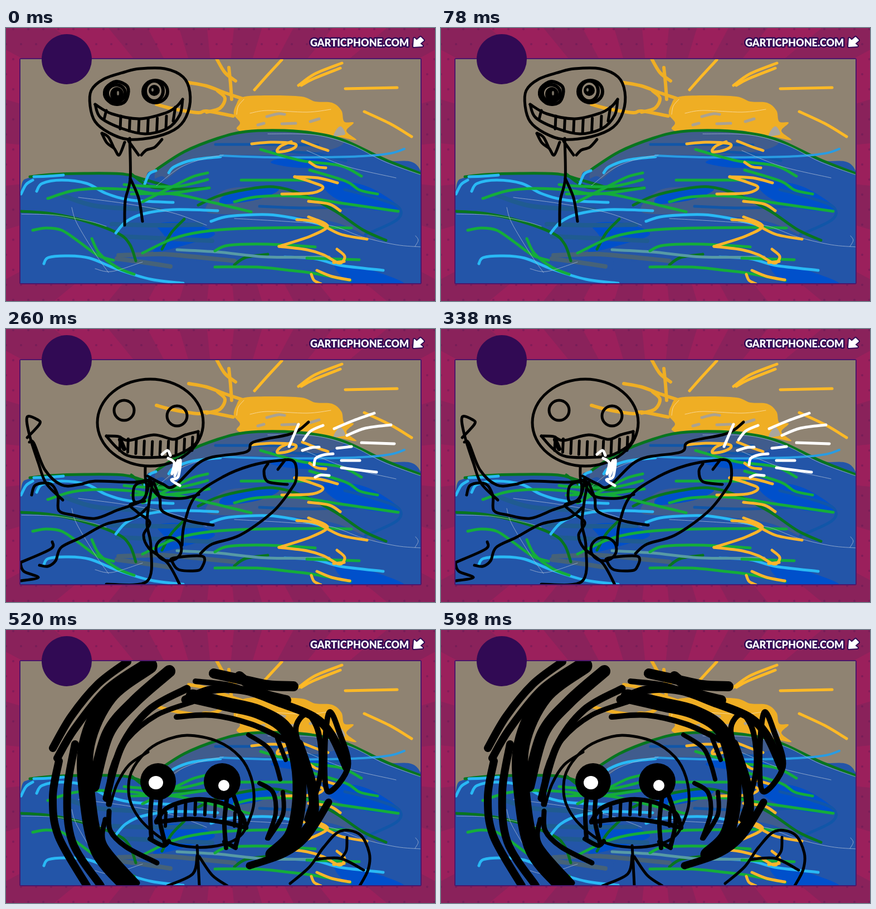
Recreate the animation shown at these times as an HTML page with a canvas. Size 770 by 490 pixels, loop 650 ms.

```html
<!DOCTYPE html>
<html lang="en">
<head>
<meta charset="utf-8">
<title>Waves at sunset</title>
<style>
html, body { margin: 0; width: 100%; height: 100%; overflow: hidden; background: #97205b; }
canvas { display: block; }
</style>
</head>
<body>
<canvas id="stage" width="770" height="490"></canvas>
<script>
const W = 770, H = 490, STEP = 130;
const stage = document.getElementById('stage').getContext('2d');
const backdrop = document.createElement('canvas');
backdrop.width = W;
backdrop.height = H;
let g = backdrop.getContext('2d');

// Smooth curve through the given x, y pairs.
function curve(p) {
  const path = new Path2D(), n = p.length / 2;
  const closed = n > 3 && p[0] === p[2 * n - 2] && p[1] === p[2 * n - 1];
  const at = i => {
    if (closed) i = (i + n - 1) % (n - 1);
    i = Math.max(0, Math.min(n - 1, i));
    return [p[2 * i], p[2 * i + 1]];
  };
  path.moveTo(p[0], p[1]);
  for (let i = 0; i < n - 1; i++) {
    const [a, b, c, d] = [at(i - 1), at(i), at(i + 1), at(i + 2)];
    path.bezierCurveTo(b[0] + (c[0] - a[0]) / 6, b[1] + (c[1] - a[1]) / 6,
      c[0] - (d[0] - b[0]) / 6, c[1] - (d[1] - b[1]) / 6, c[0], c[1]);
  }
  return path;
}
function pen(color, width) {
  g.strokeStyle = color;
  g.lineWidth = width;
  g.lineCap = g.lineJoin = 'round';
}
const line = (...p) => g.stroke(curve(p));
function thick(width, ...p) {
  g.lineWidth = width;
  line(...p);
}
function area(color, ...p) {
  g.fillStyle = color;
  g.fill(curve(p));
}
function oval(x, y, rx, ry = rx, color) {
  g.beginPath();
  g.ellipse(x, y, rx, ry, 0, 0, 7);
  if (color) {
    g.fillStyle = color;
    g.fill();
  } else g.stroke();
}
function panel(draw) {
  g.save();
  g.beginPath();
  g.rect(26, 56, 718, 402);
  g.clip();
  draw();
  g.restore();
}

function wallpaper() {
  g.fillStyle = '#9b205c';
  g.fillRect(0, 0, W, H);
  g.fillStyle = '#8a225b';
  for (let i = 0; i < 16; i++) {
    const a = (i + .25) * Math.PI / 8;
    g.beginPath();
    g.moveTo(385, 245);
    g.arc(385, 245, 500, a, a + Math.PI / 16);
    g.fill();
  }
  for (let row = 0; row < 19; row++)
    for (let x = row % 2 ? 0 : 13; x < W; x += 27)
      oval(x, row * 27 + 2, 2, 2, 'rgba(82,24,82,.35)');
  g.fillStyle = '#4c176b';
  g.beginPath();
  g.roundRect(24, 54, 722, 406, 3);
  g.fill();
}

function sun() {
  pen('#efae24', 6);
  line(328, 98, 360, 104, 395, 117, 425, 127);
  line(270, 137, 300, 145, 345, 152, 360, 149, 408, 158);
  line(360, 151, 384, 144, 393, 126, 380, 113);
  line(378, 55, 393, 80, 412, 95);
  line(400, 71, 403, 100, 405, 128);
  pen('#ffb926', 5);
  line(446, 111, 470, 84, 495, 57);
  line(525, 103, 555, 82, 603, 63);
  line(530, 103, 552, 91, 600, 72);
  line(609, 109, 702, 107);
  line(643, 150, 690, 172, 728, 195);
  area('#efae24', 409, 155, 413, 138, 425, 124, 470, 121, 530, 123, 555, 132, 585, 134,
    602, 148, 607, 168, 624, 170, 611, 185, 629, 201, 600, 196, 575, 194, 540, 184,
    500, 186, 460, 183, 430, 187, 414, 181, 420, 170, 409, 155);
  pen('#aaa292', 5);
  line(468, 159, 488, 154, 500, 155);
  line(452, 174, 463, 171);
  line(495, 172, 520, 171);
  line(546, 168, 562, 163);
  area('#aaa69d', 588, 194, 594, 181, 602, 177, 609, 190, 600, 193, 588, 194);
  pen('#f7d798', 1);
  line(414, 155, 417, 140, 427, 128);
  line(438, 153, 470, 148, 540, 151, 583, 146);
}

function water() {
  const sea = '#2355a8', slate = '#405c8d', vivid = '#0050cb';
  area(sea, 250, 280, 270, 254, 320, 222, 380, 198, 430, 187, 500, 185, 560, 190,
    610, 203, 680, 236, 746, 262, 746, 460, 250, 460, 250, 280);
  area(slate, 270, 256, 320, 223, 380, 199, 430, 187, 500, 186, 560, 191, 606, 204,
    575, 220, 490, 228, 390, 229, 330, 241, 278, 278, 270, 256);
  area(sea, 26, 297, 42, 268, 75, 263, 150, 261, 220, 262, 255, 274, 290, 281,
    290, 460, 26, 460, 26, 297);
  area(slate, 395, 290, 480, 287, 525, 298, 580, 323, 625, 356, 665, 382, 595, 350,
    520, 338, 450, 334, 360, 330, 395, 290);
  area(vivid, 475, 241, 515, 231, 590, 240, 560, 250, 515, 250, 475, 241);
  area(vivid, 570, 278, 625, 278, 670, 295, 708, 326, 650, 325, 590, 305, 570, 278);
  area(vivid, 390, 302, 440, 288, 490, 289, 455, 307, 390, 316, 390, 302);
  area(vivid, 272, 352, 330, 350, 375, 370, 320, 390, 265, 402, 285, 377, 272, 352);
  area(vivid, 590, 424, 650, 433, 715, 460, 625, 460, 590, 424);
  pen('#1156a8', 5);
  line(376, 209, 450, 209, 560, 210);
  line(480, 222, 550, 225, 610, 238);
  line(608, 290, 660, 304, 704, 321, 702, 344, 645, 371);
  line(455, 320, 540, 323, 630, 320);
  pen('#1f5b91', 8);
  line(100, 300, 165, 320, 275, 326);
  line(190, 352, 270, 354, 350, 353);
  line(200, 374, 290, 378, 370, 382);
  pen('#466278', 8);
  line(202, 408, 260, 406, 300, 407, 410, 418);
  line(199, 414, 250, 421, 295, 428);
}

function waveLines() {
  pen('#08751f', 5);
  line(270, 254, 320, 222, 380, 198, 430, 186, 500, 184, 560, 190, 610, 203, 680, 236, 746, 262);
  line(43, 267, 80, 263, 140, 261, 210, 262, 245, 271, 300, 287);
  line(26, 329, 80, 333, 140, 346, 200, 368, 222, 388, 233, 418);
  line(225, 262, 260, 285, 320, 289, 365, 287);
  line(345, 318, 380, 302, 430, 290, 480, 285, 530, 298, 590, 328, 640, 362, 682, 381);
  line(280, 397, 297, 367, 320, 343);
  line(410, 425, 430, 412, 470, 406);
  pen('#29b9f5', 5);
  line(27, 298, 36, 281, 48, 273);
  line(50, 267, 75, 266, 103, 264);
  line(55, 293, 65, 279, 100, 273, 145, 279, 180, 297, 225, 309, 300, 313);
  line(249, 280, 257, 262, 269, 256);
  line(292, 260, 302, 249, 335, 237, 385, 231);
  line(197, 368, 215, 348, 245, 334, 300, 326, 380, 328);
  line(368, 347, 400, 338, 470, 335, 520, 342, 575, 355);
  line(68, 423, 76, 412, 110, 409, 150, 413, 200, 433, 260, 451, 318, 458);
  line(500, 411, 555, 414, 600, 426, 677, 435);
  pen('#299ce3', 4);
  line(385, 229, 470, 232, 560, 232, 640, 230, 690, 225, 715, 217);
  pen('#579aa6', 5);
  line(307, 398, 380, 402, 470, 411, 580, 411);
  pen('#14ad3a', 5);
  line(75, 306, 120, 292, 170, 288, 230, 291, 280, 298, 365, 287);
  line(212, 281, 252, 284, 310, 284, 362, 272);
  line(245, 312, 300, 284, 335, 267, 362, 260);
  line(225, 298, 300, 298, 370, 313, 440, 330);
  line(422, 273, 480, 273, 545, 273);
  line(457, 218, 530, 238, 600, 247, 638, 266);
  line(545, 255, 610, 275, 635, 291, 667, 298);
  line(410, 312, 450, 303, 520, 302, 600, 314, 704, 329);
  line(245, 404, 300, 378, 350, 366, 420, 360, 560, 358, 620, 359);
  line(375, 400, 400, 390, 470, 388, 555, 393);
  line(375, 429, 450, 429, 500, 434, 550, 440, 618, 453);
  line(48, 363, 72, 359, 100, 363, 130, 383, 165, 408, 193, 417);
  line(154, 378, 168, 405, 200, 430, 230, 442);
  line(540, 413, 634, 416);
  pen('#a6b8d4', .8);
  line(270, 283, 310, 252, 350, 236, 390, 228);
  line(470, 190, 555, 192, 620, 210, 680, 240, 746, 264);
  line(28, 334, 90, 336, 150, 347, 180, 356);
  line(130, 304, 220, 316, 300, 332, 360, 354);
  line(118, 322, 127, 350, 160, 405, 184, 439);
  line(410, 342, 500, 347, 580, 354, 640, 375, 700, 389, 746, 393);
  line(540, 220, 610, 248, 700, 269);
  line(160, 432, 190, 437, 245, 420);
  line(735, 373, 740, 381, 734, 392);
}

function glitter() {
  pen('#ffb52b', 5);
  line(441, 208, 475, 205, 515, 207, 520, 213, 506, 220, 487, 222, 493, 212, 512, 204);
  line(532, 203, 555, 212, 578, 220);
  line(545, 241, 558, 249, 574, 251);
  line(518, 267, 560, 269, 595, 278);
  line(518, 267, 550, 277, 569, 286, 550, 296, 495, 298);
  line(543, 311, 580, 316, 600, 328);
  line(522, 344, 555, 348, 600, 370, 648, 379);
  line(543, 339, 577, 355, 548, 373, 490, 392);
  line(490, 392, 540, 398, 570, 407, 598, 422, 608, 410, 594, 397);
  line(588, 421, 607, 419);
  line(548, 442, 553, 453, 565, 459);
  line(558, 435, 585, 446, 617, 452);
}

function header() {
  oval(109, 56, 45, 45, '#310a54');
  pen('#310a54', 5);
  g.font = '900 18px Lato, "Open Sans", sans-serif';
  g.strokeText('GARTICPHONE.COM', 546, 33);
  g.fillStyle = '#fff';
  g.fillText('GARTICPHONE.COM', 546, 33);
  const arrow = new Path2D('M733 19L737 23L744 17L749 22L742 28L747 32L732 33Z');
  pen('#310a54', 6);
  g.stroke(arrow);
  pen('#fff', 2);
  g.stroke(arrow);
  g.fill(arrow);
}

// Vertical strokes spread between two curved lips.
function teeth(x0, x1, count, top, height, bow) {
  for (let i = 0; i < count; i++) {
    const u = i / (count - 1), x = x0 + (x1 - x0) * u;
    const y = top + bow * 4 * u * (1 - u);
    line(x, y, x - 1, y + height);
  }
}

function grinner() {
  line(213, 79, 240, 73, 285, 73, 318, 88, 330, 115, 327, 150, 309, 178, 270, 195,
    220, 200, 185, 188, 160, 168, 151, 140, 153, 112, 175, 92, 213, 79);
  thick(6, 217, 104, 198, 96, 180, 107, 178, 123, 192, 136, 211, 134, 219, 119, 217, 104);
  oval(198, 117, 16, 15);
  oval(199, 119, 12, 13, '#000');
  oval(201, 117, 2, 4, '#777063');
  oval(268, 114, 22, 20);
  oval(266, 113, 16, 18);
  oval(266, 112, 10, 10, '#000');
  oval(263, 111, 2, 3, '#777063');
  g.lineWidth = 5;
  line(160, 137, 190, 154, 240, 163, 285, 153, 306, 141, 317, 128);
  line(160, 137, 170, 161, 210, 181, 250, 190, 290, 180, 312, 156, 317, 128);
  line(180, 148, 176, 164);
  teeth(206, 288, 6, 158, 23, 6);
  line(304, 142, 300, 167);
  line(172, 189, 181, 206, 194, 216, 203, 228, 213, 205);
  line(173, 189, 184, 196, 193, 214);
  line(220, 203, 238, 228);
  line(280, 200, 267, 214, 252, 219, 243, 228);
  line(222, 198, 223, 270, 214, 310, 213, 354);
  line(223, 270, 238, 305, 245, 347);
}

function starer() {
  line(230, 86, 270, 83, 315, 94, 345, 125, 354, 165, 349, 205, 330, 235, 290, 247,
    240, 247, 190, 228, 160, 200, 154, 173, 172, 122, 200, 97, 230, 86);
  oval(213, 149, 36, 34, '#000');
  oval(211, 147, 12, 14, '#fff');
  oval(303, 156, 36, 39, '#000');
  oval(306, 155, 14, 14, '#fff');
  pen('#777063', 1.5);
  line(279, 163, 278, 142, 286, 129);
  line(285, 179, 303, 186, 319, 181);
  pen('#000', 2);
  line(299, 158, 305, 150, 312, 152, 307, 160);
  g.lineWidth = 5;
  line(177, 190, 220, 197, 280, 200, 338, 194);
  line(183, 193, 196, 213, 245, 228, 285, 229, 321, 217, 335, 194);
  teeth(195, 328, 10, 193, 19, 12);
  line(187, 173, 186, 200);
  line(199, 181, 198, 207);
  line(335, 178, 335, 224);
  line(257, 249, 258, 295, 266, 350, 270, 412, 259, 438, 245, 459);
  line(270, 412, 287, 431, 303, 459);
  line(257, 250, 248, 282, 240, 298, 195, 319, 157, 346, 142, 343, 122, 319, 109, 294, 92, 285, 82, 285);
  line(259, 260, 274, 286, 300, 303, 350, 302, 385, 302, 416, 311);
}

function manyArms() {
  oval(259, 168, 95, 78);
  oval(212, 146, 18);
  oval(307, 156, 18);
  line(180, 192, 202, 193, 220, 200, 265, 190, 301, 198, 322, 190, 345, 184);
  line(180, 192, 200, 214, 225, 229, 280, 230, 310, 225, 341, 205, 345, 184);
  teeth(205, 335, 10, 194, 24, 8);
  thick(8, 205, 199, 212, 215);
  g.lineWidth = 5;
  line(250, 247, 251, 271, 262, 276, 257, 310, 253, 350, 260, 390, 253, 453, 180, 458);
  line(38, 195, 60, 171, 57, 163, 38, 158, 42, 190, 58, 240, 72, 277, 102, 307);
  line(42, 203, 50, 205, 70, 253, 100, 280, 132, 279, 160, 273, 230, 275, 258, 270);
  line(46, 298, 53, 280, 80, 278, 93, 299, 95, 326, 120, 334, 160, 340, 200, 325, 245, 307, 257, 277);
  line(230, 309, 231, 282, 251, 276, 249, 304, 230, 309);
  line(254, 264, 281, 278, 302, 282, 355, 235, 430, 221, 444, 203, 505, 190, 526, 181, 543, 167);
  line(257, 276, 275, 300, 316, 304, 346, 297);
  line(316, 388, 320, 350, 340, 300, 390, 265, 440, 245, 490, 236, 517, 238, 521, 268,
    510, 290, 478, 329, 420, 370, 370, 386, 349, 403);
  line(470, 242, 463, 255, 470, 274, 505, 279);
  line(501, 235, 488, 252);
  line(265, 275, 276, 304, 282, 328, 330, 345, 372, 352);
  line(249, 309, 223, 315, 236, 329, 258, 347, 247, 370, 257, 394, 290, 420, 312, 459);
  line(253, 321, 230, 339, 180, 350, 135, 374, 99, 392, 89, 416, 75, 426, 60, 424);
  line(83, 382, 80, 395, 26, 419);
  line(26, 421, 32, 435, 58, 446, 26, 452);
  oval(292, 395, 23, 21);
  line(299, 419, 301, 411, 353, 408, 351, 429, 339, 434, 310, 432, 299, 419);
  pen('#fff', 5);
  line(280, 225, 290, 218, 295, 227);
  line(291, 232, 302, 240, 298, 260, 309, 236, 303, 264, 313, 235, 309, 265, 297, 271, 312, 281);
  line(525, 171, 508, 211);
  line(569, 173, 547, 183, 534, 199);
  line(589, 179, 622, 165, 661, 151);
  line(612, 191, 645, 178, 691, 172);
  line(532, 218, 548, 213, 562, 212);
  line(594, 214, 620, 211);
  line(638, 204, 697, 206);
  line(553, 244, 556, 232, 570, 226, 587, 224);
  line(602, 236, 635, 236);
  line(555, 266, 565, 262, 580, 263);
  line(602, 249, 632, 253, 665, 257);
}

function boxyHead() {
  line(185, 105, 240, 95, 268, 90, 295, 91, 327, 109, 353, 138, 353, 183, 341, 211,
    300, 235, 255, 247, 213, 234, 184, 211, 177, 173, 168, 140, 171, 117, 185, 105);
  line(192, 131, 210, 128, 236, 131, 237, 147, 227, 162, 193, 160, 192, 131);
  oval(211, 147, 6, 6, '#000');
  line(287, 157, 292, 146, 318, 144, 323, 157, 310, 170, 293, 169, 287, 157);
  oval(306, 157, 4, 4, '#000');
  g.lineWidth = 4;
  for (let i = 0; i < 6; i++) oval(191 + i * 28, 184 - (i % 3) * 2, 10 + (i % 2) * 5, 8 - (i % 2) * 2);
  for (let i = 0; i < 6; i++) {
    const u = i / 5;
    oval(195 + 140 * u, 206 + 62 * u * (1 - u), 11, 7);
  }
  line(205, 192, 188, 207, 205, 222, 245, 229, 285, 226, 320, 218, 342, 204, 340, 190);
  line(233, 214, 246, 207, 280, 205, 295, 214);
  g.lineWidth = 5;
  line(472, 152, 471, 158, 474, 164);
  line(533, 147, 535, 160);
  line(475, 181, 493, 179, 520, 180, 542, 179, 557, 187);
  line(256, 243, 256, 306, 246, 345, 256, 378, 243, 419, 231, 452);
  line(250, 363, 262, 395, 295, 424, 312, 458);
  line(370, 306, 300, 290, 255, 268, 237, 273, 237, 289, 257, 315, 282, 340,
    330, 374, 385, 387, 425, 370, 444, 344);
  line(277, 347, 300, 322, 340, 307, 390, 302, 450, 305, 510, 323, 560, 348, 597, 375, 600, 420);
  line(285, 351, 325, 344, 430, 346, 480, 354, 530, 377, 556, 390);
  oval(270, 365, 11, 23);
  oval(294, 368, 11, 21);
  line(420, 333, 434, 346);
  line(431, 330, 441, 346);
  line(453, 334, 448, 348);
  line(602, 365, 572, 379, 554, 399, 565, 413, 598, 419);
  line(586, 399, 599, 421, 604, 402);
}

function bigHair() {
  line(220, 290, 225, 255, 250, 220, 280, 200, 325, 189, 380, 200, 420, 228, 440, 265,
    445, 310, 435, 345, 420, 370, 390, 385, 340, 390, 290, 380, 250, 350, 228, 320, 220, 290);
  oval(273, 272, 32, 33, '#000');
  oval(388, 272, 33, 33, '#000');
  oval(269, 274, 13, 12, '#fff');
  oval(391, 279, 10, 10, '#fff');
  thick(8, 262, 295, 259, 333, 261, 374);
  line(278, 297, 276, 340, 285, 381);
  line(397, 298, 392, 345, 395, 391);
  line(406, 290, 421, 340, 412, 389);
  line(258, 375, 282, 387, 292, 379);
  line(392, 380, 412, 391);
  line(270, 343, 291, 318, 340, 304, 385, 310, 420, 328, 431, 354);
  line(270, 345, 330, 339, 390, 345, 431, 355);
  g.lineWidth = 6;
  teeth(287, 411, 8, 328, 24, -21);
  g.lineWidth = 5;
  line(343, 387, 345, 420, 347, 459);
  line(343, 405, 335, 438, 290, 459);
  line(347, 407, 370, 440, 397, 459);
  line(510, 455, 545, 425, 570, 390, 600, 361, 635, 367, 652, 400, 650, 430, 635, 459);
  line(555, 412, 600, 410, 642, 431);
  line(612, 372, 611, 395, 603, 408);

  thick(14, 218, 57, 165, 97, 117, 155, 84, 212);
  line(248, 60, 180, 107, 122, 179, 92, 230);
  line(95, 235, 84, 300, 94, 370, 145, 459);
  line(124, 205, 110, 290, 119, 380, 170, 459);
  thick(29, 257, 64, 185, 119, 145, 205, 146, 300, 166, 395, 219, 459);
  thick(22, 293, 74, 230, 129, 183, 186, 157, 280);
  thick(13, 325, 105, 257, 143, 207, 210, 180, 302);
  thick(9, 335, 129, 270, 153, 217, 197, 189, 252, 184, 313);
  line(185, 325, 187, 360, 215, 389, 271, 418);
  line(178, 340, 177, 385, 236, 454);
  thick(5, 255, 219, 221, 242, 199, 277, 187, 315);

  thick(18, 373, 78, 423, 89, 470, 99, 516, 101);
  line(419, 83, 458, 113, 503, 126);
  thick(15, 322, 125, 370, 107, 430, 109, 489, 130, 551, 155, 584, 188, 611, 246);
  thick(25, 335, 119, 395, 133, 453, 147, 502, 178, 523, 237, 526, 308, 512, 369, 478, 403);
  thick(10, 306, 156, 370, 153, 440, 169, 500, 197);
  line(340, 92, 405, 100, 468, 123, 532, 144);
  line(540, 250, 520, 180, 540, 151, 561, 185, 565, 256, 540, 340);
  line(580, 148, 572, 220, 578, 290, 614, 245, 598, 183, 580, 148);
  thick(18, 525, 205, 549, 280, 550, 340, 520, 381);
  thick(13, 579, 309, 541, 369, 500, 401, 437, 423);
  thick(8, 435, 188, 470, 211, 484, 240, 492, 268);
  line(455, 275, 479, 291, 484, 329, 469, 374);
  line(497, 291, 497, 331, 471, 374);
  line(487, 195, 502, 233);
}

wallpaper();
panel(() => {
  g.fillStyle = '#8f8372';
  g.fillRect(26, 56, 718, 402);
  sun();
  water();
  waveLines();
  glitter();
});

g = stage;
const poses = [grinner, starer, manyArms, boxyHead, bigHair];
let shown = -1;
function show(time) {
  const pose = Math.floor(time / STEP) % poses.length;
  if (pose !== shown) {
    shown = pose;
    g.drawImage(backdrop, 0, 0);
    panel(() => {
      pen('#000', 5);
      poses[pose]();
    });
    header();
  }
  requestAnimationFrame(show);
}
show(0);
</script>
</body>
</html>
```
